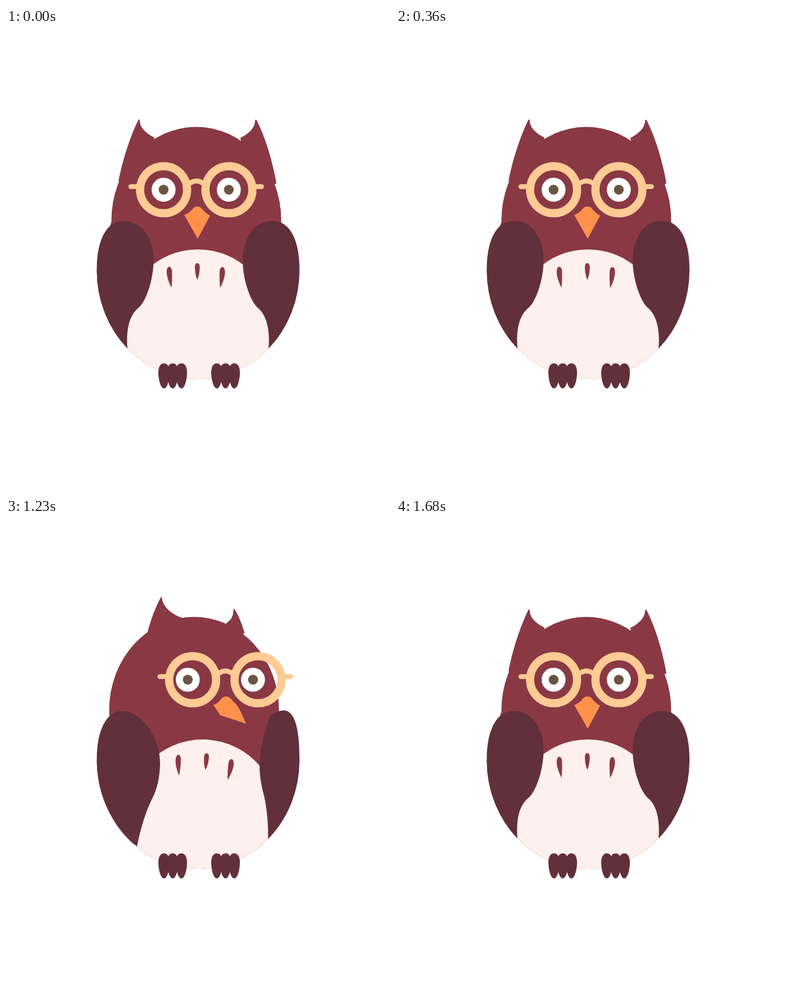
Animation, 683 px wide and 820 px high, one loop 2.73 s. Source, as an HTML page:

```html
<!DOCTYPE html>
<html lang="en">
<head>
<meta charset="utf-8">
<title>Owl</title>
<style>
  html, body { margin: 0; width: 100%; height: 100%; overflow: hidden; background: #fff; }
  svg { display: block; width: 100%; height: 100%; }
  .plum { fill: #8a3844; }
  .dark { fill: #62303a; }
  .cream { fill: #fef0ec; }
  .frame { fill: none; stroke: #ffcb94; stroke-linecap: round; stroke-width: 8.5; }
  .rim { stroke-width: 14.5; }
</style>
</head>
<body>
<svg viewBox="0 0 683 820">
  <defs>
    <path id="torso" d="M161.5 430A180 193 0 0 0 521.5 430L490 345H187Z"/>
    <clipPath id="inside"><use href="#torso"/></clipPath>
    <path id="claw" d="M0 -22.3C7 -22.3 10 -15 10 -6C10 6 6 22.3 0 22.3C-6 22.3 -10 6 -10 -6C-10 -15 -7 -22.3 0 -22.3Z"/>
    <path id="spot" d="M4 37C-1 28 -4.7 17 -4.7 9C-4.7 -3 4 -3 4.8 8C5.2 18 4.8 28 4 37Z"/>
    <g id="foot"><use href="#claw" x="-15.5"/><use href="#claw"/><use href="#claw" x="15.5"/></g>
    <g id="eye"><circle r="21.3" fill="#fff"/><circle r="8.7" fill="#6a5541"/></g>
  </defs>
  <g id="owl">
    <ellipse id="head" class="plum" cx="338.5" cy="341" rx="151" ry="165.5"/>
    <path id="earL" class="plum"/>
    <path id="earR" class="plum"/>
    <use href="#torso" class="plum"/>
    <g clip-path="url(#inside)">
      <g id="belly">
        <circle class="cream" cx="341.5" cy="526" r="133"/>
        <use href="#spot" class="plum" x="290.5" y="424"/>
        <use href="#spot" class="plum" transform="translate(384.8 424.5) scale(-1 1)"/>
        <path class="plum" d="M340.3 447C337 440 336 431 336 424C336 415 344.6 415 344.6 424C344.6 431 343.6 440 340.3 447Z"/>
      </g>
    </g>
    <path id="wingL" class="dark"/>
    <path id="wingR" class="dark"/>
    <use href="#foot" class="dark" x="296.5" y="617.5"/>
    <use href="#foot" class="dark" x="390.5" y="617.5"/>
    <g id="eyes">
      <use href="#eye" x="280.3" y="287"/>
      <use href="#eye" x="396.3" y="287"/>
    </g>
    <g id="glasses" class="frame">
      <path d="M222 281.5H233M444 281.5H454.5M325 277Q339 266 352 277"/>
      <circle class="rim" cx="280.3" cy="287" r="41.8"/>
      <circle class="rim" cx="396.5" cy="287" r="41.8"/>
    </g>
    <path id="beak" fill="#ff914b"/>
  </g>
</svg>
<script>
  const LOOP = 2730, STEP = 30;
  const el = id => document.getElementById(id);
  const place = (id, value) => el(id).setAttribute('transform', value);
  const smooth = x => {
    x = Math.min(1, Math.max(0, x));
    return x * x * (3 - 2 * x);
  };

  // Each part: facing forward, then facing right
  const shapes = {
    earL: [
      'M200 272C207 235 221 192 235 164C236 162 238 162 238 165C238 177 250 188 264 194.5L250 290Z',
      'M252 201C258 180 266 158 275 141.5C276 139.5 277.5 140 277.5 143C279 156 292 170 314 177.5L300 230Z'],
    earR: [
      'M481 276C474 236 462 196 446.5 165C445 162 443 162 443 165C442.5 178 431 188 417 195L430 290Z',
      'M424.5 204C419 187 414 173 407 163C406 160.5 404.5 160.5 404.5 163.5C404.5 173 401 181 392 186.5L390 230Z'],
    wingL: [
      'M161.5 428C161.5 378 178 342.5 209 342.5C244 342.5 262.5 376 262.5 412C262.5 445 250 483 237 495.5C221 508 213 530 216 569A180 193 0 0 1 161.5 428Z',
      'M161.5 428C161.5 378 178 342.5 207 342.5C240 342.5 274 388 274 435C274 460 268 483 261 496C249 520 240 548 233 583A180 193 0 0 1 161.5 428Z'],
    wingR: [
      'M522 428C522 378 506 342.5 474 342.5C463 342.5 453 346 445 352C429 364 421 390 421 412C421 445 434 483 447 496C463 508 470 535 467 569A180 193 0 0 0 522 428Z',
      'M522 428C522 375 514 341.5 494 341.5C486 341.5 476 346 469 352C460 376 452 412 451 440C451 462 456 482 459 493C464 515 467 545 466 570A180 193 0 0 0 522 428Z'],
    beak: [
      'M317 332C323 330 329 325 332 321C336 315.5 344 315.5 348 320C352 325 357 330 363 333L341 374L328 351Z',
      'M369 332C375 330 380 325 383 321C387 315.5 395 315.5 399 320C404 325 410 331 414 337L427 365L381 350Z']
  };

  function mix(a, b, k) {
    const to = b.match(/[\d.]+/g);
    let i = 0;
    return a.replace(/[\d.]+/g, n => +n + (to[i++] - n) * k);
  }

  function draw(t) {
    // Squash and recover, wings swaying one way and then the other
    const p = Math.min(1, t / 360);
    const e = smooth(1 - Math.abs(2 * p - 1));
    const sway = 7 * Math.sin(2 * Math.PI * p);
    // Look to the side and back
    const back = Math.min(1, Math.max(0, (t - 1350) / 330));
    const turn = smooth((t - 900) / 210) - smooth(1 - (1 - back) ** 1.4);

    for (const id in shapes) el(id).setAttribute('d', mix(...shapes[id], turn));
    place('owl', `translate(341.5 625.6) scale(${1 + 0.19 * e} ${1 - 0.19 * e}) translate(-341.5 -625.6)`);
    place('head', `translate(${-4 * turn} 0)`);
    place('belly', `translate(${8.5 * turn} 0) rotate(${4.4 * turn} 341.5 526)`);
    place('wingL', `rotate(${sway} 212 397)`);
    place('wingR', `rotate(${sway} 472 397)`);
    place('eyes', `translate(${43 * turn} ${5.3 * e})`);
    place('glasses', `translate(${51.7 * turn} ${-14 * e})`);
    place('beak', `translate(0 ${4.2 * e})`);
  }

  let start;
  function tick(now) {
    start ??= now;
    draw(Math.floor((now - start) % LOOP / STEP) * STEP);
    requestAnimationFrame(tick);
  }
  draw(0);
  requestAnimationFrame(tick);
</script>
</body>
</html>
```
